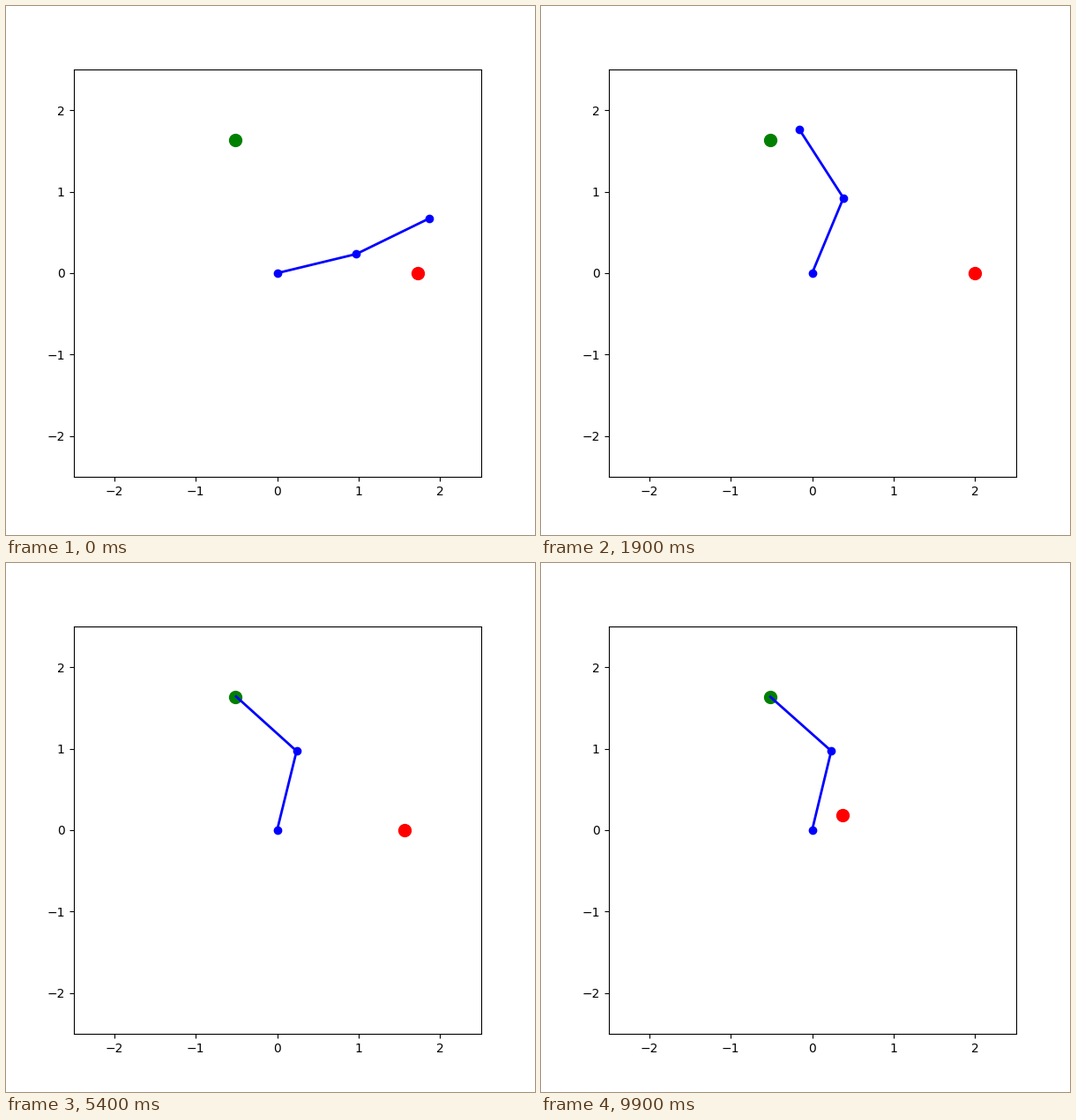
Animation, 600 px wide and 600 px high, one loop 10 s. Source, as a matplotlib script:

```python
import numpy as np
import matplotlib.pyplot as plt
from matplotlib.animation import FuncAnimation

FRAMES = 100
INTERVAL = 100

# Joint angles: final pose, starting error and decay per step
GOAL = np.array([1.334, 1.081])
ERROR = np.array([1.097, 0.864])
DECAY = np.array([0.903, 0.899])


def arm_points(angles):
    """Base, elbow and tip of an arm with two unit links."""
    a = np.cumsum(angles)
    xs = np.concatenate([[0], np.cumsum(np.cos(a))])
    ys = np.concatenate([[0], np.cumsum(np.sin(a))])
    return xs, ys


def obstacle_at(t):
    """Drift to the wall at x = 2, then back left, never below y = 0."""
    sweep = 1.75 - 1.7 * np.sin(0.0185 * (t - 48))
    x = min(2, 1.7316 + 0.045 * t, sweep)
    hump = 0.00166 * (t - 21.3) * (49.3 - t)
    y = max(0, hump, 0.0098 * (t - 80.6))
    return x, y


fig, ax = plt.subplots(figsize=(6, 6), dpi=100)
ax.set_xlim(-2.5, 2.5)
ax.set_ylim(-2.5, 2.5)
ax.set_aspect("equal")

joints, = ax.plot([], [], "o", color="blue", markersize=6)
goal_x, goal_y = arm_points(GOAL)
ax.plot(goal_x[-1:], goal_y[-1:], "o", color="green", markersize=10)
obstacle, = ax.plot([], [], "o", color="red", markersize=10)
links, = ax.plot([], [], "-", color="blue", linewidth=2)


def update(i):
    xs, ys = arm_points(GOAL - ERROR * DECAY ** i)
    joints.set_data(xs, ys)
    links.set_data(xs, ys)
    x, y = obstacle_at(i)
    obstacle.set_data([x], [y])
    return joints, obstacle, links


anim = FuncAnimation(fig, update, frames=FRAMES, interval=INTERVAL,
                     repeat=True, repeat_delay=0)
plt.show()
```
